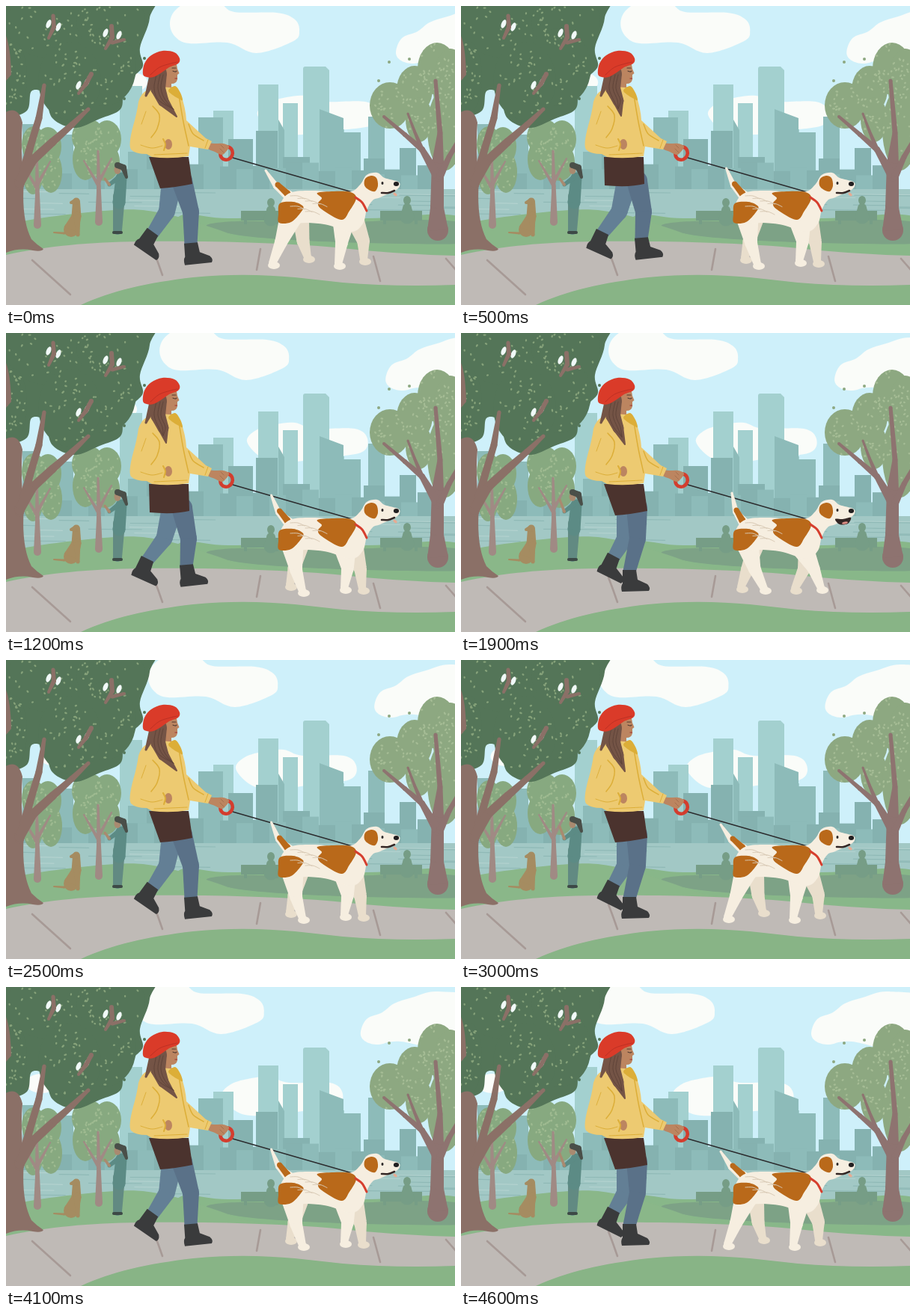
These frames come from a looping animation (600x400 px, 4700 ms). An HTML page with a canvas:

```html
<!DOCTYPE html>
<html lang="en">
<head>
<meta charset="utf-8">
<title>Walk in the park</title>
<style>
html, body { margin: 0; width: 100%; height: 100%; overflow: hidden; background: #cef0fa; }
canvas { display: block; width: 600px; height: 400px; }
</style>
</head>
<body>
<canvas id="stage" width="600" height="400"></canvas>
<script>
const c = document.getElementById('stage').getContext('2d');
const LOOP = 4700, STEP = 100;

const parse = s => s.split(' ').map(p => p.split(',').map(Number));

function random(seed) {
  return () => (seed = seed * 16807 % 2147483647) / 2147483647;
}

// Smooth curve through the points
function spline(s, closed) {
  const p = parse(s), n = p.length, path = new Path2D();
  const at = i => closed ? p[(i + n) % n] : p[Math.max(0, Math.min(n - 1, i))];
  path.moveTo(...p[0]);
  for (let i = 0; i < (closed ? n : n - 1); i++) {
    const [a, b, d, e] = [at(i - 1), at(i), at(i + 1), at(i + 2)];
    path.bezierCurveTo(b[0] + (d[0] - a[0]) / 6, b[1] + (d[1] - a[1]) / 6,
      d[0] - (e[0] - b[0]) / 6, d[1] - (e[1] - b[1]) / 6, d[0], d[1]);
  }
  return path;
}
function blob(color, s) {
  const path = spline(s, true);
  c.fillStyle = color;
  c.fill(path);
  return path;
}
function shape(color, d) {
  c.fillStyle = color;
  c.fill(new Path2D(d));
}
function line(color, w, ...list) {
  c.strokeStyle = color;
  c.lineWidth = w;
  c.lineCap = c.lineJoin = 'round';
  for (const s of list) c.stroke(spline(s, false));
}
function oval(color, x, y, rx, ry = rx, turn = 0) {
  c.fillStyle = color;
  c.beginPath();
  c.ellipse(x, y, rx, ry, turn, 0, 7);
  c.fill();
}

// Tapered limb through joints [x, y, width]
function limb(color, ...joints) {
  joints.forEach(([x, y, w], i) => {
    oval(color, x, y, w / 2);
    if (!i) return;
    const [u, v, z] = joints[i - 1];
    const d = Math.hypot(x - u, y - v) * 2, nx = (v - y) / d, ny = (x - u) / d;
    c.beginPath();
    c.moveTo(u + nx * z, v + ny * z);
    c.lineTo(x + nx * w, y + ny * w);
    c.lineTo(x - nx * w, y - ny * w);
    c.lineTo(u - nx * z, v - ny * z);
    c.fill();
  });
}
const branch = (color, s) => limb(color, ...parse(s));

// Tree crown made of ovals, sprinkled with light leaves
function crown(color, light, seed, count, s) {
  const r = random(seed), lobes = parse(s);
  for (const l of lobes) oval(color, ...l);
  for (let i = 0; i < count; i++) {
    const [x, y, rx, ry] = lobes[i % lobes.length], a = r() * 6.28, d = Math.sqrt(r()) * .95;
    oval(light, x + rx * d * Math.cos(a), y + ry * d * Math.sin(a), 1.2, 1.4 + r() * .7, r() * 3);
  }
}

function clouds(f) {
  const white = '#fafcf9';
  c.save();
  c.translate(-1.152 * f, 0);
  blob(white, '219,24 226,6 250,-8 285,-4 305,8 362,9 386,18 392,33 384,47 335,63 296,49 245,50 226,41');
  blob(white, '521,62 529,43 550,34 566,22 590,14 625,6 690,20 660,85 575,73 545,77 528,73');
  blob(white, '336,146 348,130 375,122 400,120 425,128 480,128 497,142 488,160 436,167 400,172 360,169');
  for (const [x, y] of parse('95,129 118,120 145,109 168,102')) oval(white, x, y, 21, 13);
  c.restore();
}

// Each entry: left, right, roof
function rects(color, s) {
  c.fillStyle = color;
  for (const [x1, x2, y] of parse(s)) c.fillRect(x1, y, x2 - x1, 246 - y);
}

function city() {
  const far = '#a3d0cf', mid = '#8dbbb9', near = '#85b2b0';
  rects(far, '152,182,107 337,364,105 370,390,130 277,304,140 432,452,165');
  shape(far, 'M397 246V84Q397 81 400 81H427L432 86V246Z');
  rects(mid, '22,40,158 70,90,172 163,190,195 257,290,149 450,474,169 484,506,148');
  shape(mid, 'M419 246V138L451 150V246Z M364 152L372 166V246H364Z');
  rects(near, '188,204,190 297,330,178 334,363,167 370,406,202 478,506,204 526,548,190');
  const r = random(8);
  for (let x = 0; x < 570; x += 22) rects(x % 4 ? near : mid, `${x},${x + 22},${208 + r() * 24}`);
}

function ground() {
  c.fillStyle = '#a2c8c5';
  c.fillRect(0, 245, 600, 60);
  const r = random(19);
  for (let i = 0; i < 26; i++) {
    const x = r() * 580, y = 248 + i * 1.3;
    line(i % 3 ? '#8fb9b6' : '#b3d2cf', 1.2, `${x},${y} ${x + 30 + r() * 60},${y + .7}`);
  }
  blob('#88b789', '225,288 300,284 480,284 620,288 640,400 225,400');
  blob('#7da286', '268,295 310,288 430,290 550,286 620,292 630,316 480,317 330,309');
  bench(314, 354, 263);
  bench(500, 536, 260);
  blob('#8ab789', '-30,300 0,292 45,284 100,277 145,273 183,273 230,282 280,298 325,313 380,323 400,360 200,420 -40,420');
  shape('#bfbab6', 'M0 333C55 321 110 316 180 315C280 314 370 317 440 323Q520 332 600 334V400H0Z');
  line('#a79a96', 2.6, '35,340 86,386', '197,327 203,343 209,360', '340,325 335,353', '491,335 500,368', '588,338 602,354');
  shape('#88b486', 'M100 400C140 381 190 370 250 363C330 355 390 363 450 370Q520 376 600 373V400Z');
}

function bench(x, px, py) {
  const g = '#769d86';
  c.fillStyle = g;
  c.fillRect(x, 274, 56, 13);
  for (const leg of [4, 46]) c.fillRect(x + leg, 286, 4, 6);
  oval(g, px, py, 5, 6);
  limb(g, [px, py + 10, 12], [px, py + 22, 19]);
}

function smallTree(x, foot, seed, lobes) {
  const wood = '#a08a84';
  crown('#87a980', '#9fbb91', seed, 60, lobes);
  limb(wood, [x, foot, 10], [x, foot - 40, 6], [x - 1, foot - 95, 3]);
  limb(wood, [x, foot - 48, 5], [x - 20, foot - 82, 2]);
  limb(wood, [x, foot - 54, 5], [x + 17, foot - 85, 2]);
}

function neighbour(f) {
  const fur = '#a58c61', teal = '#5c8b85', skin = '#a98a70';
  limb(fur, [94, 262, 10], [94, 282, 13], [87, 299, 20]);
  limb(fur, [94, 261, 9], [87, 263, 4]);
  limb(fur, [95, 280, 9], [96, 306, 5]);
  limb(fur, [78, 304, 3], [64, 303, 2]);
  limb('#628a82', [151, 255, 16], [149, 300, 12]);
  limb('#3d4946', [144, 303, 4], [154, 303, 4]);
  limb(teal, [154, 230, 15], [151, 263, 17]);
  oval(skin, 149, 219, 4.5, 6);
  limb('#4a4f49', [149, 213, 8], [157, 216, 8], [161, 229, 4]);
  const hand = f % 4 < 2 ? 231 : 223;
  limb(teal, [150, 230, 7], [138, 239, 5]);
  limb(skin, [138, 239, 4], [132, hand, 3]);
}

function rightTree() {
  const wood = '#8e7370', green = '#8da881';
  crown(green, '#a5bc95', 91, 130, '513,133,27,31 546,112,24,32 576,84,26,35 594,105,24,48 552,152,18,30 587,165,24,55');
  for (const [x, y] of parse('539,71 512,75 498,100')) oval(green, x, y, 2);
  branch(wood, '577,300,28 576,270,18 577,210,16 580,170,7 574,100,5');
  branch(wood, '577,228,13 556,192,8 533,172,6 505,148,4');
  branch(wood, '556,192,6 546,168,4 537,144,3');
  branch(wood, '580,228,10 592,202,7 606,178,6');
}

function bigTree() {
  const wood = '#8b7067', green = '#547558';
  blob(green, '-30,-30 188,-30 192,16 179,56 183,80 171,94 157,112 153,138 125,151 92,163 62,150 52,118 34,114 28,140 0,150 -30,150');
  crown(green, '#86a27a', 12, 170, '60,25,60,45 140,20,46,40 130,82,44,52 85,100,42,52 10,95,18,48');
  for (const [x, y] of parse('166,106 185,70 158,124')) oval(green, x, y, 2);
  for (const [x, y] of parse('57,24 70,28 133,36 151,39 97,106 108,102')) oval('#f1f9f8', x, y, 3, 6, .4);
  branch(wood, '63,13,5 64,28,6 57,43,4');
  branch(wood, '141,27,6 142,42,6 133,57,4');
  branch(wood, '158,45,4 142,49,5');
  branch(wood, '114,91,6 107,104,6 97,117,4');
  shape(wood, 'M0 40Q6 55 7 92L0 100Z');
  shape(wood, 'M-2 143Q16 132 22 156Q19 190 24 232Q20 285 34 312Q42 320 50 325Q48 329 36 327Q18 323 0 330Z');
  branch(wood, '18,240,12 32,190,10 44,150,9 51,106,5');
  branch(wood, '18,236,14 36,206,12 62,182,11 88,159,8 110,138,5');
}

// Paw targets: hind far, hind near, front far, front near
const PAWS = [
  '404,339 357,347 479,342 445,348',
  '380,340 397,348 477,345 453,344',
  '375,343 406,345 447,345 482,344'
].map(parse);
const HIPS = parse('394,284,22 382,279,32 464,280,26 452,279,34');

function dog(n) {
  const cream = '#f6eee0', rust = '#b9691a';
  limb(cream, [378, 254, 14], [361 + 3 * n, 241 - n, 8], [347 + 7.5 * n, 220 - 3 * n, 3]);
  limb(rust, [376, 251, 9], [363 + 2.5 * n, 239 - n, 7]);
  HIPS.forEach(([x, y, w], i) => {
    const [px, py] = PAWS[n][i], color = i % 2 ? cream : '#e9decc';
    const bend = i < 2 ? -2 : 348 - py;
    limb(color, [x, y, w], [(x + px) / 2 + bend, (y + py) / 2 + 3, 17], [px - 1, py - 3, 10]);
    oval(color, px + 1, py, 8, 5);
  });
  blob(cream, '366,276 369,260 382,249 410,247 440,249 462,248 474,238 482,226 496,223 506,230 524,235 526,241 520,247 500,256 490,260 482,273 477,291 462,302 430,293 404,290 368,290');
  blob(rust, '366,264 384,262 397,268 394,276 381,289 365,290 364,278');
  blob(rust, '416,250 438,248 460,249 468,257 459,274 448,286 422,272 417,264 422,257');
  for (let i = 0; i < 7; i++) {
    const x = 380 + i % 4 * 10, y = 254 + i * 3.5;
    line('#d8c9b4', 1, `${x},${y} ${x + 10},${y} ${x + 19},${y + 4}`);
  }
  blob(rust, '480,231 488,227 495,230 497,240 493,248 485,246 479,240');
  line('#d63e2e', 3, '467,256 476,263 482,274');
  oval('#2b2727', 503, 237, 1.5, 2);
  oval('#211f20', 521.5, 238, 3.6, 3);
  if (n === 2) {
    blob('#332624', '500,249 510,249 521,247 517,255 506,256');
    oval('#dc8d85', 513, 254, 4, 1.6, -.2);
  } else {
    line('#332624', 2.6, '502,250 511,250 519,247');
    oval('#e6ab93', 520, 252, 3, 1.8, .6);
  }
}

// Ankles as [x, y, boot tilt in degrees]
const STRIDES = [
  { back: [196, 302, 36], front: [247, 317, -4], hair: [228, 148], swing: 1 },
  { back: [204, 298, 28], front: [225, 317, 0], hair: [219, 149], swing: 1 },
  { back: [189, 302, 26], front: [241, 310, -5], hair: [214, 147], swing: 0 }
];

function leg(color, hip, [x, y, tilt]) {
  limb(color, [hip, 234, 28], [(hip + x) / 2 + 6, 275, 22], [x, y + 2, 17]);
  c.save();
  c.translate(x, y);
  c.rotate(tilt * Math.PI / 180);
  shape('#3a3b3c', 'M-9 0H9L11 13L24 19Q29 24 26 28L-10 29Q-12 22 -9 18Z');
  c.restore();
}

function woman({ back, front, hair, swing }) {
  const skin = '#bc8560', gold = '#edca71', fold = '#dcae38';
  leg('#637f95', 222, back);
  leg('#5a7188', 235, front);
  shape('#4b332e', `M191 202H244L${245 + 4 * swing} 238Q225 243 ${192 + 14 * swing} ${240 + 4 * swing}Z`);

  c.strokeStyle = '#d33d2e';
  c.lineWidth = 4.6;
  c.beginPath();
  c.ellipse(294.5, 197, 8.2, 8.8, .4, 0, 7);
  c.stroke();
  blob(skin, '268,183 278,184 290,184 298,188 293,196 288,199 279,195 270,191');
  line('#9c694b', .8, '287,186 291,190', '286,191 291,196');

  shape(skin, 'M210 78H228L229 84L231.5 90L229 92L229 98Q228 104 221 104V114H209Z');
  line('#503a31', 1.1, '223,87 226,88 228,87', '222,83 227,83');
  line('#a94c43', 1.3, '226,97 228.5,97');
  shape(gold, 'M188 113Q202 107 219 109Q231 111 234 120Q240 136 241 153L267 177L275 181L270 192L246 188L244 201Q219 205 195 202L188 198Q173 198 167 192Q163 186 170 160Q175 143 177 128Q181 116 188 113Z');
  blob(fold, '217,113 226,107 233,116 236,126 231,124 224,120');
  line(fold, 1.5, '231,119 234,138 238,160 244,187', '196,134 205,146 202,164 194,176', '244,158 250,171 264,180');
  line(fold, 1, '270,179 266,190', '180,186 195,190 209,187', '198,199 242,197', '187,141 181,158');
  oval(skin, 217, 185, 5, 7);
  line(fold, 2, '210,178 213,185 211,193');

  const brown = '#745446';
  limb(brown, [205, 90, 20], [203, 110, 20], [210, 127, 15], [...hair, 2]);
  limb(brown, [197, 95, 12], [187, 120, 3]);
  for (const x of [201, 206, 210])
    line('#5b4036', .8, `${x},92 ${x - 3},110 ${x + 3},126 ${hair[0] - 4},${hair[1] - 10}`);
  blob('#da3b29', '183,91 185,77 194,66 209,60 225,62 232,70 230,77 218,82 208,89 197,95 188,95');
  line('#bd3024', 1, '193,92 205,82 220,77 229,75');
}

// Stride and paw order over eight steps
const WOMAN = [0, 1, 2, 1];
const DOG = [0, 1, 2, 2, 1, 1, 0, 0];

function draw(f) {
  c.fillStyle = '#cef0fa';
  c.fillRect(0, 0, 600, 400);
  clouds(f);
  city();
  ground();
  smallTree(42, 293, 31, '37,185,16,24 56,188,18,26 36,222,14,30 60,222,15,28');
  smallTree(124, 289, 57, '110,175,22,24 135,178,19,25 106,205,17,28 132,208,20,26');
  neighbour(f);
  rightTree();
  bigTree();
  line('#2b2b2d', 1.4, '303,203 466,250');
  dog(DOG[f % 8]);
  woman(STRIDES[WOMAN[(f >> 1) % 4]]);
}

let shown = -1;
function tick() {
  const f = Math.floor(performance.now() % LOOP / STEP);
  if (f !== shown) draw(shown = f);
  requestAnimationFrame(tick);
}
tick();
</script>
</body>
</html>
```
